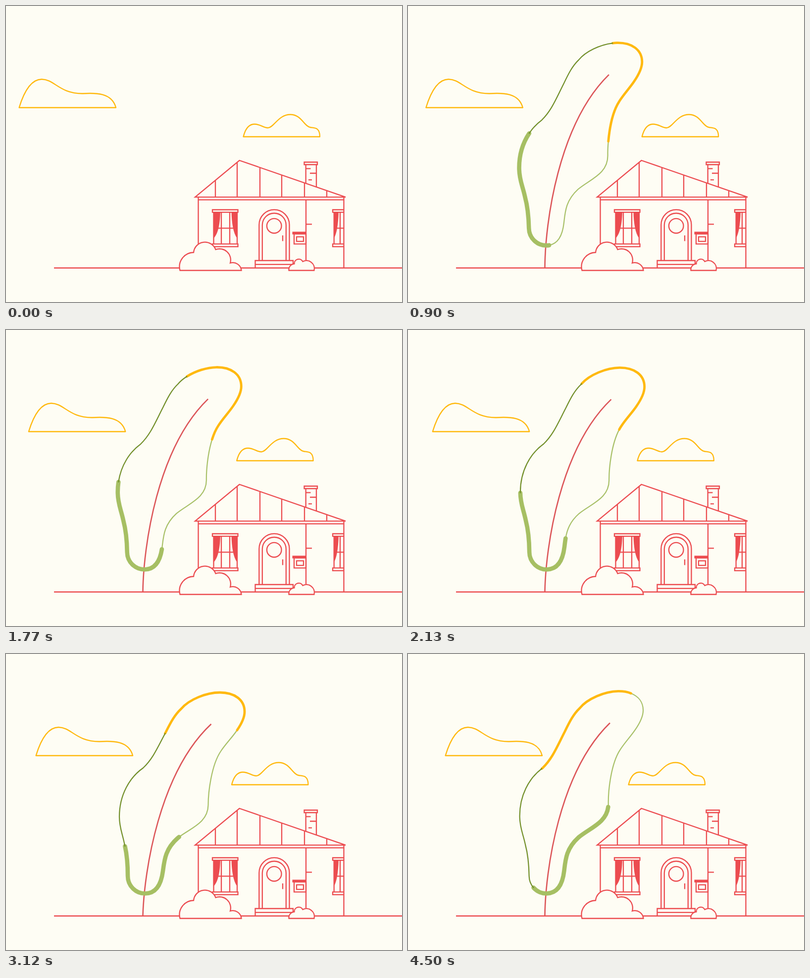
These frames come from a looping animation (800x600 px, 4530 ms). An HTML page:

```html
<!DOCTYPE html>
<html lang="en">
<head>
<meta charset="utf-8">
<title>House and tree</title>
<style>
  html, body { margin: 0; width: 100%; height: 100%; overflow: hidden; background: #fefdf4; }
  svg { display: block; width: 100%; height: 100%; fill: none; stroke-width: 2.3; }
  .house { stroke: #ec4c50; }
  .solid { fill: #ec4c50; stroke: none; }
  .bush { fill: #fefdf4; }
  .cloud { stroke: #ffb90f; stroke-linejoin: round; }
  #tree { stroke-linecap: round; }
</style>
</head>
<body>
<svg viewBox="0 0 800 600">
  <path id="cloudLeft" class="cloud" d="M26.5 206C40 162 57 148.5 72 148.5C98 148.5 108 178 155 177.5C180 176 214 175 222 206Z"/>
  <path id="cloudRight" class="cloud" d="M479.5 265C484 247 492 239.5 502 239.5C514 239.5 520 247 529 247C541 247 550 220 574.5 220C597 220 602 244 615 246C622 247 634 245 634 265Z"/>

  <g class="house">
    <path d="M97 531H800"/>
    <!-- roof and walls -->
    <path d="M382 387.3L471.5 313L686 387.3Z M423 353V387M467 317V387M513 327.5V387M557 343V387M603 359V387M648 374.5V387"/>
    <path d="M388.5 387V531M682.5 387V531M388.5 392.8H682.5M606 393V531M606 442.3H618"/>
    <!-- chimney -->
    <path d="M602.5 316.5H629V321.5H602.5ZM605.7 321.5V360M627 321.5V367M606 329.7H615.5M614 339H627M611 352.3H618"/>
    <!-- windows -->
    <path d="M417 413H468.5V418.2H417ZM417 482.3H468.5V487.8H417ZM419.5 418V482M467 418V482M435 418V482M452 418V482M429 450.3H459"/>
    <path d="M682.5 413H660V418.2H682.5M682.5 482.3H660V487.8H682.5M662.7 418V482M675 418V482M669 450.3H682.5"/>
    <path class="solid" d="M419.5 418H433C432 445 428 462 419.5 471ZM455.5 418H467V471C459 460 456 440 455.5 418ZM662.7 418H672C671 445 668 461 662.7 471Z"/>
    <!-- door and steps -->
    <path d="M511.3 516V443.5A30.6 30.6 0 0 1 572.5 443.5V516M517.8 516V444A24 24 0 0 1 565.8 444V516M559 465V476.5"/>
    <circle cx="541.7" cy="445.7" r="14.8"/>
    <path d="M503.5 516H580V523.8H503.5ZM503.5 524V531"/>
    <!-- letter box -->
    <path d="M582 462H606V482.3H582ZM587 467.8H601V477.2H587Z"/>
    <path class="solid" d="M578.5 457.5H607V463H578.5Z"/>
    <path class="bush" d="M351.5 536A29 29 0 0 1 379 499.5A23 23 0 0 1 423.5 493.7A22.5 22.5 0 0 1 453 521A17.3 17.3 0 0 1 475.5 536Z"/>
    <path class="bush" d="M571.5 536A12 12 0 0 1 582.5 522.5A9 9 0 0 1 599.5 518A16 16 0 0 1 622.5 536Z"/>
  </g>

  <g id="tree">
    <path id="trunk" pathLength="1" stroke="#dc5558" stroke-width="2.6" stroke-linecap="butt" d="M276.5 530C279 440 310 240 414.5 142"/>
  </g>
</svg>
<script>
const LOOP = 4530, GROW = 820, TRUNK_GROW = 780;
const SWAY_START = 1070, SWAY_PEAK = 3120;
const CROWN = 'M281 485.5C305 485.5 314 463 317 440C320 417 322 395 347 373C372 353 408 343 408.5 306' +
  'C408.5 280 415 225 434 197C443 183 456 170 465 157C475 143 482 130 482 117C482 93 462 78 432 78' +
  'C405 78 370 92 354 111C341 123 333 138 323 158C306 190 297 212 277 231C250 250 229 285 229 330' +
  'C229 352 235 363 239.5 386C243 400 246 420 246 450C246 470 262 485.5 281 485.5Z';

const byId = id => document.getElementById(id);
const tree = byId('tree'), trunk = byId('trunk');

// Four strokes share the outline; slot is each one's place along it.
const strokes = [
  { slot: 0, color: '#a8c068', width: 2.2 },
  { slot: 3, color: '#a6bf63', width: 8.6 },
  { slot: 1, color: '#ffb90f', width: 4.8 },
  { slot: 2, color: '#728f2a', width: 2.2 }
].map(({ slot, color, width }) => {
  const path = document.createElementNS('http://www.w3.org/2000/svg', 'path');
  const attrs = { d: CROWN, pathLength: 4, stroke: color, 'stroke-width': width };
  for (const name in attrs) path.setAttribute(name, attrs[name]);
  tree.append(path);
  return { path, slot };
});

function easeInOut(x) {
  x = Math.min(x, 1);
  return x < 0.5 ? 4 * x ** 3 : 1 - 4 * (1 - x) ** 3;
}

function dash(path, start, length, total) {
  path.setAttribute('stroke-dasharray', `${length} ${total - length}`);
  path.setAttribute('stroke-dashoffset', -start);
}

function moveX(id, x) {
  byId(id).setAttribute('transform', `translate(${x} 0)`);
}

function draw(now) {
  const t = now % LOOP;
  moveX('cloudLeft', t * 0.0109);
  moveX('cloudRight', t * -0.00755);

  const grown = easeInOut(t / GROW);
  const phase = (Math.max(t, SWAY_START) - SWAY_PEAK) / (SWAY_PEAK - SWAY_START);
  const angle = -0.63 * (1 - Math.cos(Math.PI * phase)) - 4.4 * (1 - grown);
  tree.setAttribute('transform', `rotate(${angle} 276.5 530)`);
  tree.setAttribute('visibility', grown > 0.001 ? 'visible' : 'hidden');

  dash(trunk, 0, easeInOut(t / TRUNK_GROW), 2);
  const travel = Math.max(0, t - GROW) * 0.00024;
  for (const { path, slot } of strokes) dash(path, slot * grown + travel, grown, 4);
}

function frame() {
  draw(performance.now());
  requestAnimationFrame(frame);
}
frame();
</script>
</body>
</html>
```
